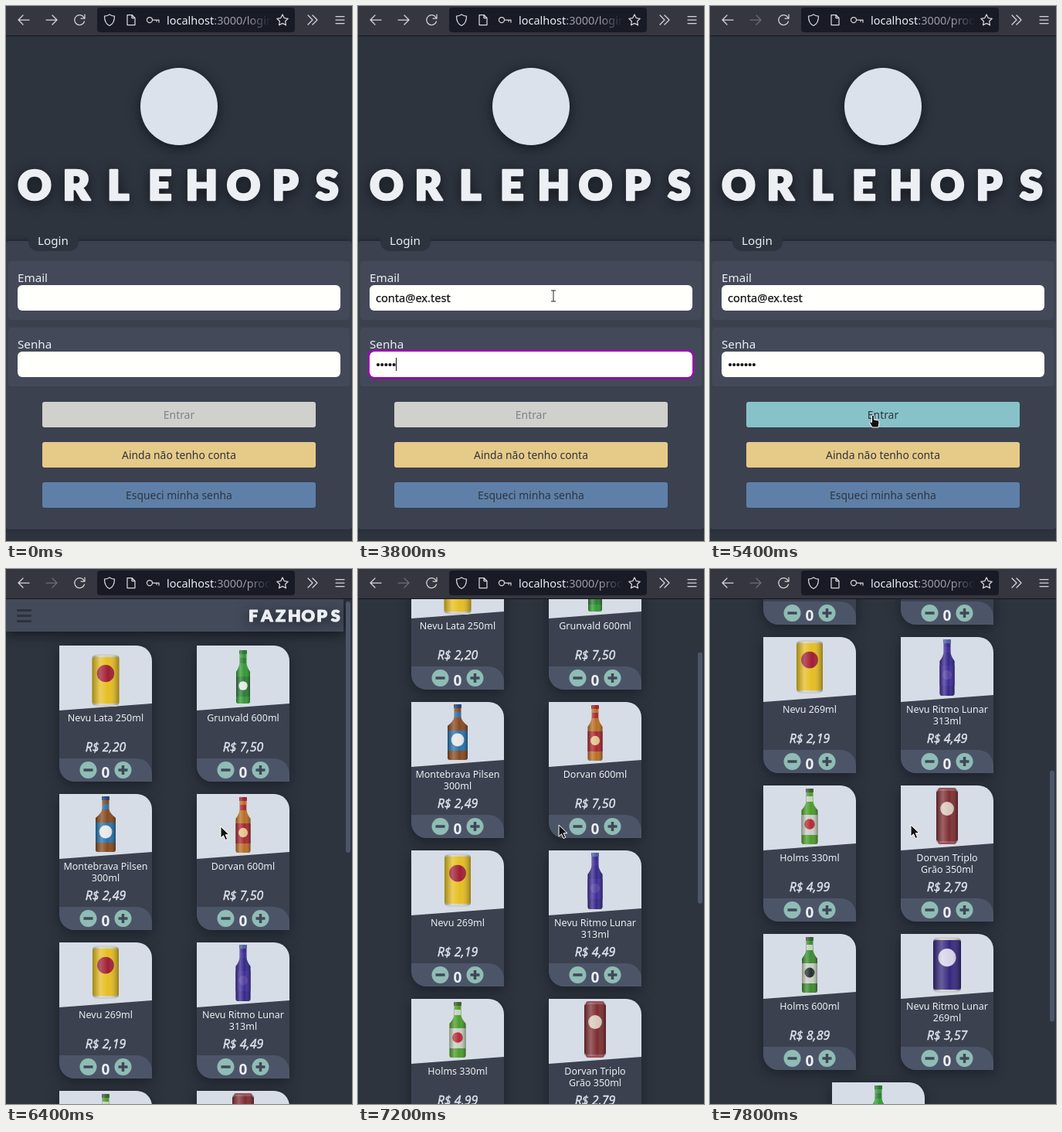
An HTML page for the animation above (8000 ms loop, 448 px wide and 692 px high).

```html
<!DOCTYPE html>
<html lang="pt-BR">
<head>
<meta charset="utf-8">
<title>Login e produtos</title>
<style>
html, body { margin: 0; width: 100%; height: 100%; overflow: hidden; background: #2d343e; }
svg { display: block; width: 100%; height: 100%; }
text { font-family: "Noto Sans", "Open Sans", sans-serif; fill: #eceff4; white-space: pre; }
.brand { font-family: Lato, sans-serif; font-weight: 900; text-anchor: middle; stroke: #eceff4; stroke-linejoin: round; }
.label { font-size: 15.2px; }
.field { font-size: 14.6px; fill: #15161c; stroke: #15161c; stroke-width: .25; }
.button { font-size: 13.9px; text-anchor: middle; fill: #2e3440; }
.title { font-size: 12.5px; text-anchor: middle; }
.price { font-size: 16px; font-style: italic; text-anchor: middle; fill: #dfe5ee; stroke: #dfe5ee; stroke-width: .35; }
.count { font-size: 19px; font-weight: 700; text-anchor: middle; }
.url { font-size: 14.5px; }
.icon { fill: none; stroke: #d6d6da; stroke-width: 1.25; stroke-linecap: round; stroke-linejoin: round; }
.raised { filter: drop-shadow(0 3px 8px rgba(10, 12, 18, .75)); }
.panel { filter: drop-shadow(0 -1px 3px rgba(10, 12, 18, .4)); }
.card { filter: drop-shadow(0 4px 8px rgba(10, 12, 18, .5)); }
</style>
</head>
<body>
<svg viewBox="0 0 448 692" preserveAspectRatio="none">
  <defs>
    <linearGradient id="fade"><stop stop-color="#181a25" stop-opacity="0"/><stop offset="1" stop-color="#181a25"/></linearGradient>
    <linearGradient id="round">
      <stop stop-color="#000" stop-opacity=".3"/><stop offset=".3" stop-color="#fff" stop-opacity=".25"/>
      <stop offset=".6" stop-color="#fff" stop-opacity="0"/><stop offset="1" stop-color="#000" stop-opacity=".35"/>
    </linearGradient>
  </defs>
  <rect width="448" height="692" fill="#2d343e"/>
  <g id="login"></g>
  <g id="shop"><g id="page"></g><rect id="thumb" x="440" width="6" height="325" rx="3" fill="#4c566a"/></g>
  <g id="toolbar">
    <rect width="448" height="39" fill="#35363f"/>
    <rect y="38" width="448" height="1" fill="#15161c"/>
    <rect x="118" y="2" width="256" height="32" rx="4" fill="#181a25"/>
    <text class="url" x="208" y="24">localhost<tspan id="path" fill="#9a9aa2"></tspan></text>
    <rect x="314" y="6" width="29" height="25" fill="url(#fade)"/>
    <rect x="342" y="6" width="31" height="25" fill="#181a25"/>
    <g class="icon">
      <path d="M30 18H16m6-6-6 6 6 6"/>
      <path id="forward" d="M52 18h14m-6-6 6 6-6 6"/>
      <path d="M101 15a6.500 6.500 0 1 0 .5 5M102 11v5h-5"/>
      <path d="M134 11c2 1.500 4 2 6.500 2 0 6-2 10.500-6.500 12.500-4.500-2-6.500-6.500-6.500-12.500 2.500 0 4.500-.5 6.500-2z"/>
      <path d="M157 11.500h6l4 4v9h-10zM163 11.500v4h4"/>
      <circle cx="186" cy="18" r="3.500"/><path d="M190 18h8v3m-3-3v2"/>
      <path d="m358 11 2.200 4.600 5 .7-3.600 3.500.9 5-4.500-2.400-4.500 2.400.9-5-3.600-3.500 5-.7z"/>
      <path d="m391 12 6 6-6 6m6-12 6 6-6 6M427 13.500h11m-11 4.500h11m-11 4.500h11"/>
    </g>
  </g>
  <g id="pointer">
    <g id="beam" fill="none">
      <path d="M-3-7H3M0-7V7M-3 7H3" stroke="#fff" stroke-width="3"/>
      <path d="M-3-7H3M0-7V7M-3 7H3" stroke="#222"/>
    </g>
    <path id="arrow" d="M0 0V15l3.500-3.300 2.500 5.800 2.700-1.200-2.500-5.600H11z" fill="#111" stroke="#fff"/>
    <path id="hand" d="M-1.500 1Q0-1 1.500 1V6l5 1q2 .5 1.500 3l-1 6h-8L-4.500 10Q-4 8-1.500 9.500z" fill="#111" stroke="#fff"/>
  </g>
</svg>
<script>
const $ = id => document.getElementById(id);
const show = (id, on) => $(id).setAttribute("visibility", on ? "inherit" : "hidden");
const rect = (x, y, w, h, fill, rx = 0, extra = "") =>
  `<rect x="${x}" y="${y}" width="${w}" height="${h}" rx="${rx}" fill="${fill}" ${extra}/>`;
const text = (cls, x, y, value, extra = "") => `<text class="${cls}" x="${x}" y="${y}" ${extra}>${value}</text>`;
const spaced = (word, x, pitch, y, size) =>
  text("brand raised", [...word].map((_, i) => x + i * pitch).join(" "), y, word,
    `font-size="${size}" stroke-width="${size / 20}"`);

// Login page
const field = (name, label, y) =>
  rect(3, y, 442, 76, "#434959", 4) + text("label", 15, y + 27, label) +
  rect(15, y + 31, 418, 33, "#fffffb", 6) +
  rect(13.8, y + 29.8, 420.4, 35.4, "none", 7, `id="${name}Ring" stroke="#a000b4" stroke-width="2.400"`);
const button = (id, y, fill, label) =>
  rect(47, y, 354, 33, fill, 3, `id="${id}"`) + text("button", 224, y + 22, label, `id="${id}Label"`);
const dots = Array.from({ length: 7 }, (_, i) =>
  `<circle id="dot${i}" cx="${26 + i * 5.15}" cy="464" r="2.100" fill="#15161c"/>`).join("");

$("login").innerHTML =
  `<circle class="raised" cx="224" cy="130" r="50" fill="#dbe2ec"/>` +
  spaced("ORLEHOPS", 37, 54.1, 251, 53.5) +
  rect(0, 304, 448, 373, "#3b414f", 4, 'class="panel"') +
  rect(29, 290, 65, 27, "#2d343e", 12) + text("label", 41, 309, "Login") +
  field("email", "Email", 330) + field("secret", "Senha", 416) +
  text("field", 23, 383, "conta@ex.test", 'id="email"') + dots +
  rect(0, 0, 1, 17, "#15161c", 0, 'id="caret"') +
  button("enter", 512, "#d0d1cc", "Entrar") +
  button("join", 564, "#e6ca88", "Ainda não tenho conta") +
  button("forgot", 616, "#5e80a8", "Esqueci minha senha");

// Products page
const can = (width, top, bottom, body, badge, rim = "#cfcfca") => {
  const x = 60 - width / 2, h = bottom - top;
  return rect(x + 2, top, width - 4, h, rim, 3) + rect(x, top + 4, width, h - 8, body, 3) +
    `<circle cx="60" cy="${top + h * .37}" r="${width * .32}" fill="${badge}"/>` +
    rect(x, top + 2, width, h - 4, "url(#round)", 3);
};
const bottle = (width, top, bottom, body, label, badge, cap) => {
  const r = width / 2, n = 4.5;
  const shape = `M${60 - n} ${top}h${2 * n}v16q0 5 ${r - n} 12V${bottom - 3}q0 3-3 3H${63 - r}q-3 0-3-3V${top + 28}q${r - n}-7 ${r - n}-12z`;
  return `<path d="${shape}" fill="${body}"/>` + rect(55, top, 10, 5, cap, 1) + rect(56, top + 10, 8, 7, label) +
    rect(60 - r, top + 34, width, 26, label) +
    `<circle cx="60" cy="${top + 46}" r="${r * .65}" fill="${badge}"/><path d="${shape}" fill="url(#round)"/>`;
};
const products = [
  ["Nevu Lata 250ml", "2,20", can(35, 11, 79, "#e5be20", "#a01d32")],
  ["Grunvald 600ml", "7,50", bottle(18, 6, 75, "#319a32", "#2b7b35", "#e4ebe4", "#2c6f32")],
  ["Montebrava Pilsen|300ml", "2,49", bottle(26, 3, 75, "#87491f", "#2573ad", "#e8e8e8", "#263f73")],
  ["Dorvan 600ml", "7,50", bottle(19, 4, 76, "#b96d24", "#a82630", "#e5c38a", "#98202a")],
  ["Nevu 269ml", "2,19", can(34, 4, 73, "#e5be20", "#a01d32")],
  ["Nevu Ritmo Lunar|313ml", "4,49", bottle(19, 3, 76, "#35268a", "#3d2c98", "#54409f", "#4c5d9c")],
  ["Holms 330ml", "4,99", bottle(21, 4, 76, "#4c9b2b", "#c8cec2", "#b32832", "#3a5a35")],
  ["Dorvan Triplo|Grão 350ml", "2,79", can(28, 3, 76, "#7d2d31", "#d9c9bb", "#98525a")],
  ["Holms 600ml", "8,89", bottle(20, 4, 76, "#3c8a30", "#c8cec2", "#222e2a", "#3a5a35")],
  ["Nevu Ritmo Lunar|269ml", "3,57", can(36, 4, 76, "#36277e", "#d7d4e8")],
  ["Grunvald 330ml", "4,29", bottle(20, 4, 76, "#319a32", "#2b7b35", "#e4ebe4", "#2c6f32")]
];
const card = ([title, price, picture], i) => {
  const x = i === 10 ? 158 : 69 + i % 2 * 178, y = 99 + (i >> 1) * 192;
  return `<g class="card" transform="translate(${x} ${y})">
    <path d="M0 0H100a20 20 0 0 1 20 20V176H20a20 20 0 0 1-20-20z" fill="#3b414e"/>
    <path d="M0 0H100a20 20 0 0 1 20 20V75L0 84z" fill="#d6dde6"/>
    <path d="M0 146H100a20 20 0 0 1 20 20v10H20a20 20 0 0 1-20-20z" fill="#4c5568"/>
    ${picture}
    ${title.split("|").map((line, k) => text("title", 60, 98 + k * 15, line)).join("")}
    ${text("price", 60, 137, "R$ " + price)}
    <g fill="#8fbcb4"><circle cx="37.500" cy="161" r="11"/><circle cx="82.500" cy="161" r="11"/></g>
    <path d="M31.500 161h12m33 0h12m-6-6v12" stroke="#3f4859" stroke-width="3.500"/>
    ${text("count", 60, 171, "0")}
  </g>`;
};
$("page").innerHTML =
  rect(0, 39, 437, 42, "#434a5a", 0, 'class="raised"') +
  [52, 59, 66].map(y => rect(14, y, 19, 3, "#2b323d", 1)).join("") +
  spaced("FAZHOPS", 320, 17.8, 68, 21.5) +
  products.map(card).join("");

// Timeline: keys are [ms, value, ...]
const along = (t, keys) => {
  const next = keys.findIndex(k => k[0] > t);
  if (next < 0) return keys[keys.length - 1].slice(1);
  if (next === 0) return keys[0].slice(1);
  const a = keys[next - 1], b = keys[next], p = (t - a[0]) / (b[0] - a[0]);
  return a.slice(1).map((v, i) => v + (b[i + 1] - v) * p);
};
const pointerPath = [
  [400, 345, 373], [500, 345, 373], [600, 310, 374], [700, 268, 375], [800, 253, 375],
  [4600, 253, 375], [4700, 248, 420], [4800, 238, 490], [4900, 224, 542], [5000, 214, 540], [5100, 211, 529],
  [5400, 211, 529], [5500, 214, 528], [5800, 214, 528], [5900, 226, 505], [6000, 243, 465], [6100, 243, 465],
  [6200, 258, 415], [6300, 272, 360], [6400, 278, 333], [6700, 270, 332], [6900, 260, 331]
];
const scrollPath = [[6900, 0], [7000, 25], [7100, 70], [7200, 119], [7800, 395]];
const keyTimes = [2700, 2900, 3100, 3400, 3800, 4300, 4500];

function draw(now) {
  const t = Math.floor(now % 8000 / 100) * 100;
  const onShop = t >= 5500, typed = keyTimes.filter(k => t >= k).length;
  show("login", !onShop);
  show("shop", onShop);

  const emailFocus = t >= 800 && t < 1900, secretFocus = t >= 1900 && t < 5300;
  const filled = t >= 1400;
  show("emailRing", !onShop && emailFocus);
  show("secretRing", !onShop && secretFocus);
  show("email", !onShop && filled);
  keyTimes.forEach((_, i) => show("dot" + i, !onShop && i < typed));
  show("caret", !onShop && (emailFocus || secretFocus));
  $("caret").setAttribute("x", secretFocus ? 23 + Math.round(typed * 5.15) : filled ? 23 + Math.round($("email").getComputedTextLength()) : 23);
  $("caret").setAttribute("y", secretFocus ? 455 : 369);
  const enabled = typed === keyTimes.length;
  $("enter").setAttribute("fill", enabled ? "#88c2c9" : "#d0d1cc");
  $("enterLabel").style.fill = enabled ? "#2e3440" : "#808285";

  const routed = t >= 5400;
  $("path").textContent = routed ? ":3000/produ" : ":3000/login";
  $("forward").setAttribute("opacity", routed ? .35 : 1);

  const [scroll] = along(t, scrollPath);
  $("page").setAttribute("transform", `translate(0 ${-scroll})`);
  $("thumb").setAttribute("y", 42 + scroll * .553);

  const [x, y] = along(t, pointerPath);
  const overField = !onShop && (y > 361 && y < 394 || y > 447 && y < 480);
  const overButton = !onShop && y > 512 && y < 545;
  show("pointer", t >= 400);
  $("pointer").setAttribute("transform", `translate(${x} ${y})`);
  show("beam", t >= 400 && overField);
  show("hand", t >= 400 && overButton);
  show("arrow", t >= 400 && !overField && !overButton);
}
const start = performance.now();
(function tick() {
  draw(performance.now() - start);
  requestAnimationFrame(tick);
})();
</script>
</body>
</html>
```
